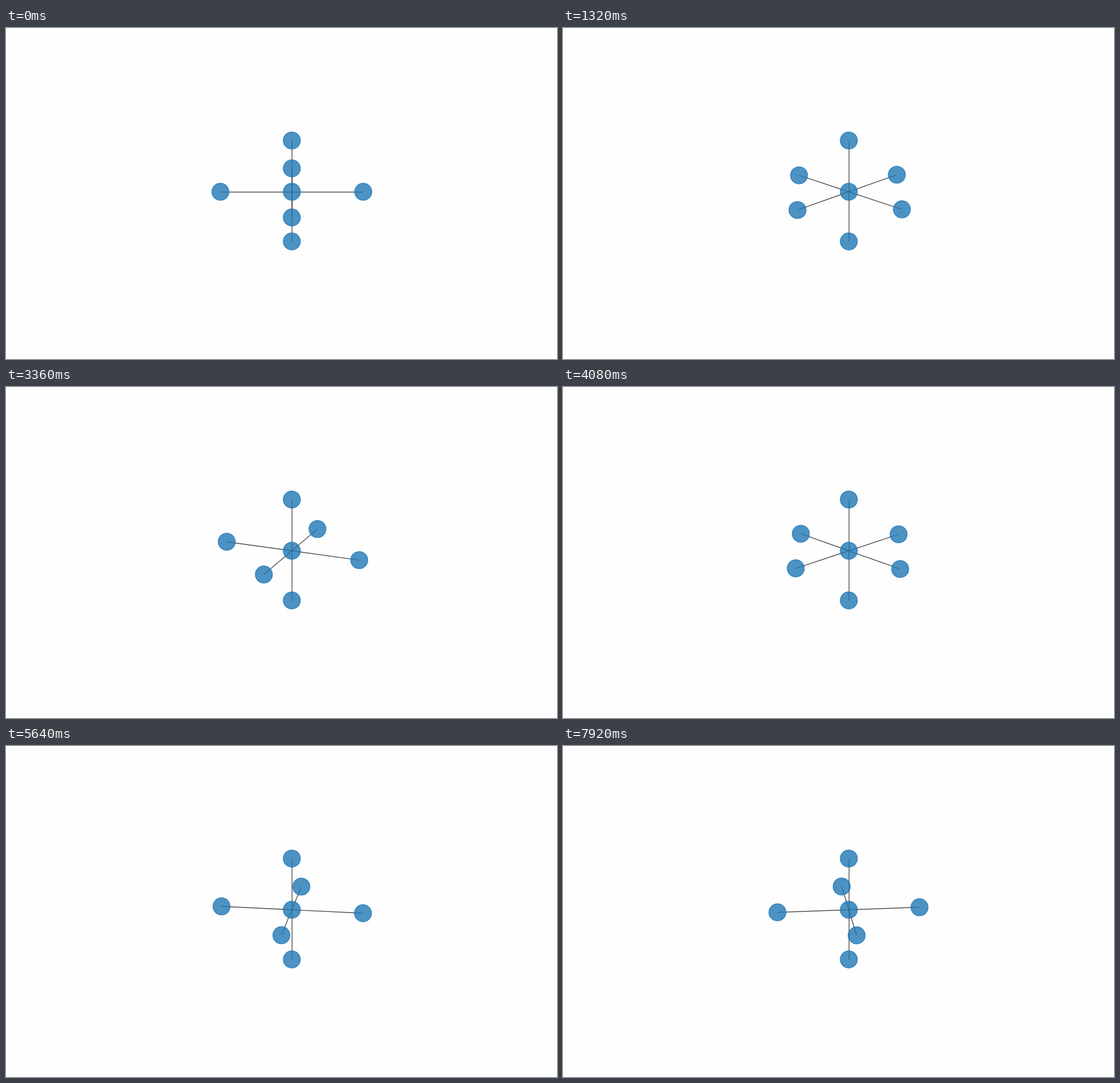
An HTML page for the animation above (8000 ms loop, 966 by 580 pixels).

```html
<!DOCTYPE html>
<html lang="en">
<head>
<meta charset="utf-8">
<title>Rotating graph</title>
<style>
  html, body { margin: 0; width: 100%; height: 100%; overflow: hidden; background: #fefefe; }
  svg { display: block; }
  line { stroke: #000; stroke-opacity: .7; stroke-width: 1.39; }
  circle { fill: #1f77b4; fill-opacity: .8; stroke: #1f77b4; stroke-opacity: .8; stroke-width: 1.39; }
</style>
</head>
<body>
<svg id="stage" width="966" height="580" viewBox="0 0 966 580"></svg>
<script>
const LOOP = 8000, STEP = 120, TURN = 4;
const HUB = { x: 501.1, y: 287 };
const RX = 125.2, RY = 42.9, PERSPECTIVE = 0.0465;
const stage = document.getElementById('stage');

function add(tag, attrs = {}) {
  const el = document.createElementNS('http://www.w3.org/2000/svg', tag);
  set(el, attrs);
  return stage.appendChild(el);
}

function set(el, attrs) {
  for (const name in attrs) el.setAttribute(name, attrs[name]);
}

// Point on the tilted ring; 0 degrees faces the viewer.
function ringPoint(deg) {
  const a = deg * Math.PI / 180;
  const scale = 1 / (1 - PERSPECTIVE * Math.cos(a));
  return {
    x: HUB.x - RX * Math.sin(a) * scale,
    y: HUB.y + RY * Math.cos(a) * scale
  };
}

const snap = v => Math.floor(v) + 0.5;

// Axis-aligned edges sit on whole pixels.
function drawEdge(el, p) {
  const straight = Math.abs(p.x - HUB.x) < 0.01 || Math.abs(p.y - HUB.y) < 0.01;
  const fit = straight ? snap : v => v;
  set(el, { x1: fit(HUB.x), y1: fit(HUB.y), x2: fit(p.x), y2: fit(p.y) });
}

const poles = [{ x: HUB.x, y: 197.2 }, { x: HUB.x, y: 374 }];
const edges = Array.from({ length: 6 }, () => add('line'));
const nodes = Array.from({ length: 6 }, () => add('circle', { r: 15 }));
add('circle', { cx: HUB.x, cy: HUB.y, r: 15 });

function render(time) {
  const angle = Math.floor(time % LOOP / STEP) * TURN;
  const points = [0, 90, 180, 270].map(d => ringPoint(angle + d)).concat(poles);
  points.forEach((p, i) => {
    drawEdge(edges[i], p);
    set(nodes[i], { cx: p.x, cy: p.y });
  });
}

const start = performance.now();
function tick() {
  render(performance.now() - start);
  requestAnimationFrame(tick);
}
tick();
</script>
</body>
</html>
```
